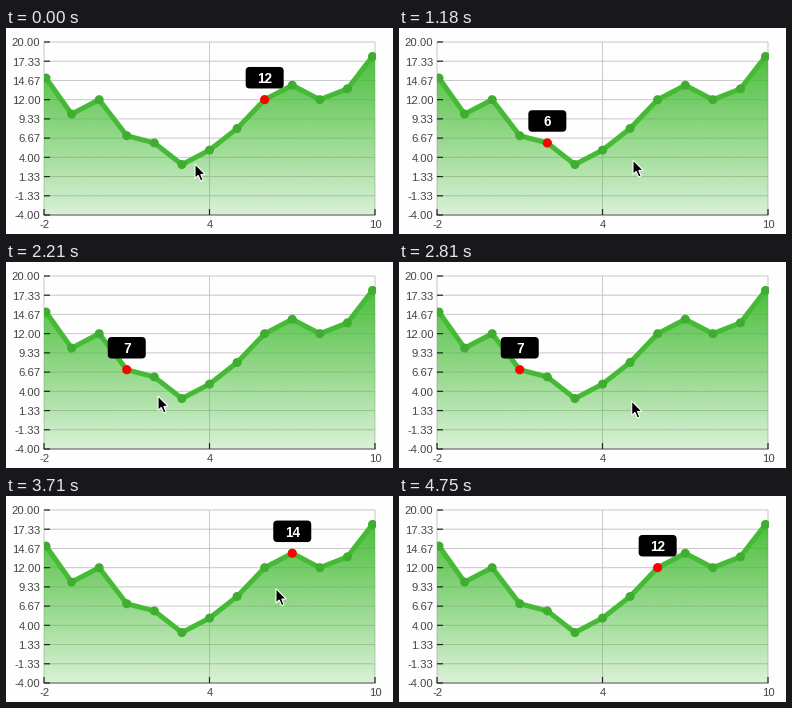
Recreate the animation shown at these times as a matplotlib script. Size 387 by 206 pixels, loop 4.9 s.

```python
import numpy as np
import matplotlib.pyplot as plt
from matplotlib.animation import FuncAnimation
from matplotlib.patches import Circle, FancyBboxPatch, Polygon, Rectangle

W, H, DPI = 387, 206, 100
LOOP, TICK, STEPS = 4900, 20, 33
LEFT, RIGHT, TOP, BOTTOM = 38, 369, 14, 187
LINE, DOT, INK = "#45ba35", "#3fad30", "#444444"

values = np.array([15, 10, 12, 7, 6, 3, 5, 8, 12, 14, 12, 13.5, 18])
xs = np.linspace(LEFT, RIGHT, len(values))
ys = BOTTOM - (values + 4) / 24 * (BOTTOM - TOP)
line_xs = np.clip(xs, LEFT + 2, RIGHT - 2.5)

# Turning points of the pointer: step, x, y
KEYS = np.array([
    (0, 189, 136), (3, 131, 138), (4, 131, 138), (5, 151, 138), (8, 234, 132),
    (11, 125, 130), (15, 152, 134), (18, 215, 149), (22, 271, 92),
    (24, 276, 94), (28, 255, 102), (31, 343, 193),
])
times, spots = KEYS[:, 0], KEYS[:, 1:]
slopes = np.gradient(spots, times, axis=0)
REFRESH = (5, 9, 14, 24, 29)  # steps at which the tooltip catches up
LAG = 0.5
ARROW = np.array([(0, 0), (0, 14.4), (3.2, 11.4), (5.7, 17), (8.1, 16),
                  (5.8, 10.5), (10.2, 10.3)])


def pointer_at(step):
    """Smooth cubic path through the turning points."""
    k = min(np.searchsorted(times, step, "right"), len(times) - 1) - 1
    span = times[k + 1] - times[k]
    u = min((step - times[k]) / span, 1)
    blend = u * u * (3 - 2 * u)
    return ((1 - blend) * spots[k] + blend * spots[k + 1]
            + span * u * (1 - u) * ((1 - u) * slopes[k] - u * slopes[k + 1]))


def picked_point(step):
    last = max((r for r in REFRESH if r <= step), default=REFRESH[-1])
    return np.argmin(abs(xs - pointer_at(last - LAG)[0]))


def px(size):
    return size * 72 / DPI


fig = plt.figure(figsize=(W / DPI, H / DPI), dpi=DPI, facecolor="#fefefe")
ax = fig.add_axes([0, 0, 1, 1])
ax.axis("off")


def segment(x, y, color, width=1, z=1):
    return ax.plot(x, y, color=color, lw=px(width), zorder=z,
                   solid_capstyle="butt", snap=False)[0]


def label(x, y, text, ha="center"):
    ax.text(x, y, text, ha=ha, va="center_baseline", color=INK,
            family="Liberation Sans", fontsize=px(11.3))


# Grid, axis marks and labels
for k, y in enumerate(np.linspace(TOP, BOTTOM, 10)):
    segment([LEFT, RIGHT], [y, y], "#c8c8c8")
    segment([LEFT, LEFT + 6], [y, y], "#222222", 1.2, 5)
    label(34.5, y + 0.3, f"{20 - k * 24 / 9:.2f}", "right")
for x, value in zip(np.linspace(LEFT, RIGHT, 3), (-2, 4, 10)):
    segment([x, x], [TOP, BOTTOM], "#c8c8c8")
    segment([x, x], [BOTTOM - 6, BOTTOM], "#222222", 1.2, 5)
    label(x + 0.3, 196.5, str(value))
segment([LEFT - 0.5, RIGHT + 0.5], [BOTTOM, BOTTOM], "#808080", 1.3, 4)

# Area fading towards the axis
shade = np.ones((160, 1, 4))
shade[..., :3] = np.array([69, 188, 53]) / 255
shade[:, 0, 3] = np.linspace(0.96, 0.2, 160)
area = ax.imshow(shade, extent=(LEFT, RIGHT, BOTTOM, ys.min()),
                 aspect="auto", interpolation="bilinear", zorder=2)
outline = [(LEFT, BOTTOM), *zip(xs, ys), (RIGHT, BOTTOM)]
area.set_clip_path(Polygon(outline, transform=ax.transData))

# Line and dots, cut at the plot edges
frame_box = Rectangle((LEFT - 0.5, 10), RIGHT - LEFT + 1.5, BOTTOM - 10,
                      transform=ax.transData)
curve = segment(line_xs, ys, LINE, 5, 6)
curve.set_solid_joinstyle("round")
curve.set_clip_path(frame_box)
for x, y in zip(line_xs, ys):
    dot = ax.add_patch(Circle((x, y), 4.5, fc=DOT, lw=0, zorder=7))
    dot.set_clip_path(frame_box)

ax.set_xlim(0, W)
ax.set_ylim(H, 0)

# Tooltip and pointer
marker = ax.add_patch(Circle((0, 0), 4.5, fc="#ff0000", lw=0, zorder=8))
bubble = ax.add_patch(FancyBboxPatch(
    (0, 0), 38, 21.5, boxstyle="round,pad=0,rounding_size=4",
    fc="black", lw=0, zorder=9, snap=False))
caption = ax.text(0, 0, "", ha="center", va="center_baseline", color="white",
                  family="Liberation Sans", weight="bold", fontsize=px(13.5),
                  zorder=10)
pointer = ax.add_patch(Polygon(ARROW, fc="black", ec="white", lw=px(1.1),
                               joinstyle="miter", zorder=12))


def update(i):
    step = min(int((i * TICK + 32) * STEPS / LOOP), STEPS - 1)
    pick = picked_point(step)
    x, y = xs[pick], ys[pick]
    marker.center = x, y
    bubble.set_x(x - 19)
    bubble.set_y(y - 32.7)
    caption.set_position((x, y - 22.2))
    caption.set_text(f"{values[pick]:g}")

    pointer.set_visible(step <= times[-1])
    pointer.set_xy(ARROW + pointer_at(step))
    return marker, bubble, caption, pointer


anim = FuncAnimation(fig, update, frames=LOOP // TICK, interval=TICK,
                     repeat=True, repeat_delay=0)
plt.show()
```
